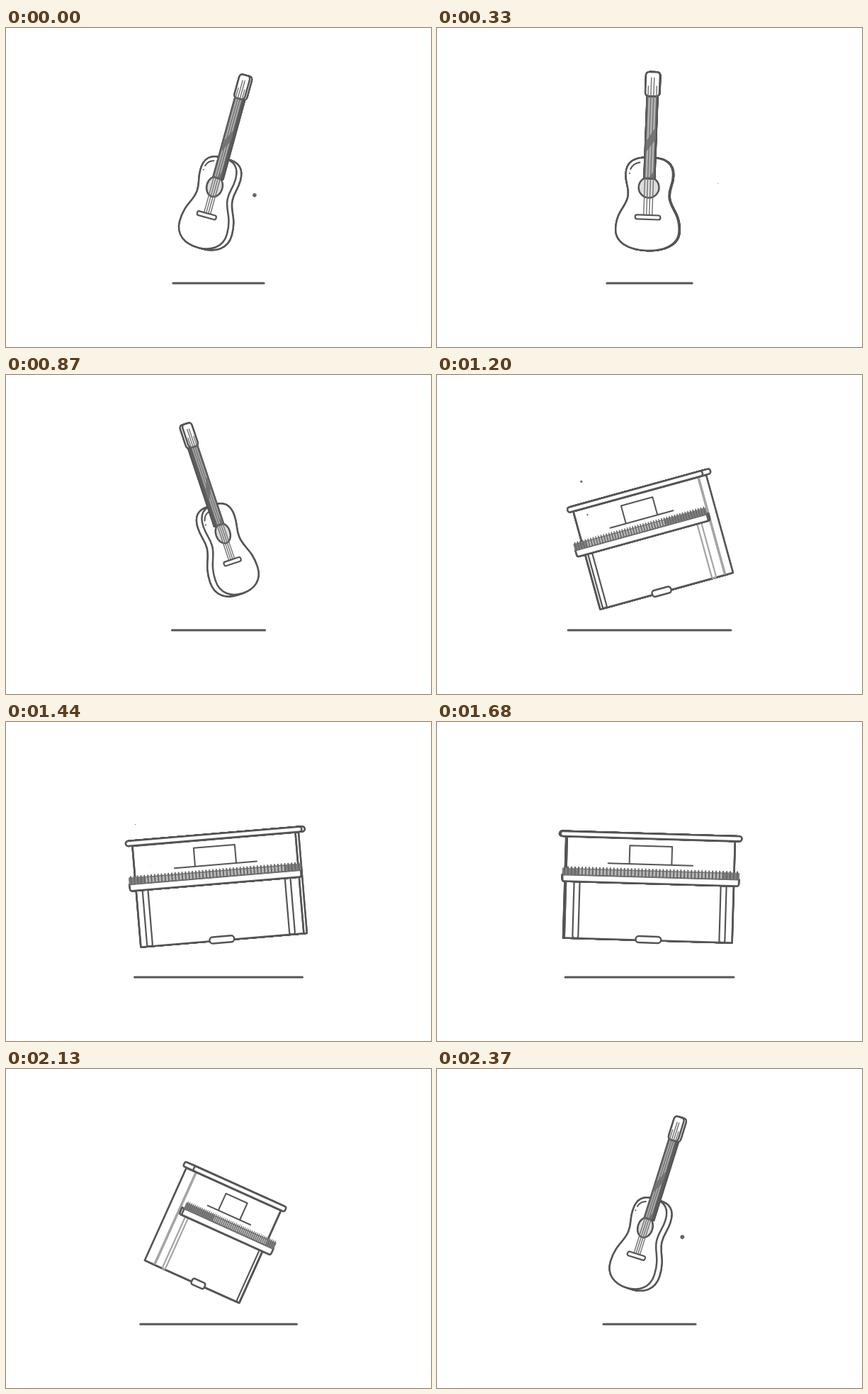
Write an HTML page with a canvas that moves like this. It is 600 px wide and 450 px high and loops after 2.4 s.

```html
<!DOCTYPE html>
<html lang="en">
<head>
<meta charset="utf-8">
<title>Guitar and piano</title>
<style>
  html, body { margin: 0; width: 100%; height: 100%; overflow: hidden; background: #fff; }
  canvas { display: block; }
</style>
</head>
<body>
<canvas id="stage" width="600" height="450"></canvas>
<script>
const ctx = document.getElementById('stage').getContext('2d');
const LOOP = 2400, HALF = 1200, INK = '#555';
const PIVOT = { x: 300, y: 217 };
let cos = 1, sin = 0;   // current yaw of the instrument

const box = (x, y, w, h, r = 0) => {
  const p = new Path2D();
  p.roundRect(x, y, w, h, r);
  return p;
};

// Flattens a path lying at depth z onto the stage.
function project(path, z) {
  const p = new Path2D();
  p.addPath(path, new DOMMatrix([cos, 0, 0, 1, sin * z, 0]));
  return p;
}

function draw(path, z, { fill, stroke = INK, width = 2.5 } = {}) {
  const p = project(path, z);
  if (fill) { ctx.fillStyle = fill; ctx.fill(p); }
  if (stroke) { ctx.strokeStyle = stroke; ctx.lineWidth = width; ctx.stroke(p); }
}

// Sweeps a path from back to front: outline, filled solid, back edge, front face.
function solid(path, back, front, side = '#fff', face = side) {
  const STEPS = 8;
  for (const style of [{}, { fill: side, stroke: null }])
    for (let i = 0; i <= STEPS; i++) draw(path, back + (front - back) * i / STEPS, style);
  draw(path, back);
  draw(path, front, { fill: face });
}

// Guitar
const bodyHalf = 'M0 -34C22 -35 33.5 -27 33.5 -10 C33.5 5 28 7 29 20 C30 36 45 42 45 68 C45 88 24 97 0 97';
const guitarBody = new Path2D(bodyHalf);
guitarBody.addPath(new Path2D(bodyHalf), new DOMMatrix([-1, 0, 0, 1, 0, 0]));
const shine = new Path2D('M-28 -11v.1M-27 -17Q-24 -25 -14 -27');
const hole = new Path2D('M-14.5 8a14.5 14.5 0 1 0 29 0a14.5 14.5 0 1 0 -29 0');
const neck = box(-7.2, -121, 14.4, 116);
const neckShade = new Path2D('M7 -78L-7 -56V-40L7 -60ZM7 -17L0 -6H7Z');
const head = box(-10, -155, 20, 34, 5);
const strings = new Path2D('M-6 -135V49M-2 -147V49M2 -147V49M6 -135V49');
const bridge = box(-18, 47, 36, 6, 3);

function drawGuitar() {
  const FRONT = 5.5;
  solid(guitarBody, -FRONT, FRONT);
  draw(shine, FRONT, { width: 2 });
  draw(hole, FRONT, { fill: '#ddd' });
  solid(neck, FRONT - 5, FRONT, '#666', '#b4b4b4');
  draw(neckShade, FRONT, { fill: '#777', stroke: null });
  solid(head, FRONT - 5, FRONT);
  draw(strings, FRONT, { stroke: '#707070', width: 1.4 });
  draw(bridge, FRONT, { fill: '#fff', width: 2.2 });
}

// Piano
const cabinet = box(-119, -52, 238, 143);
const cabinetEdge = new Path2D('M119 -50V89');
const lid = box(-128.5, -59.5, 257, 7, 3.5);
const stand = new Path2D('M-30 -16.5V-42H30V-16.5M-60 -16H60');
const leg = box(100, 11, 8, 80, [0, 0, 3, 3]);
const pedal = box(-18, 85.5, 36, 9, 4.5);
const shelf = box(-125, 1.5, 250, 9.5, [0, 0, 3, 3]);
const keyBed = box(-125, -7, 250, 8.5);
const keys = new Path2D();
for (let x = -122.5; x <= 122.5; x += 5) keys.addPath(box(x - 1, -10, 2, 12));

const mirrored = (path, side) => {
  const p = new Path2D();
  p.addPath(path, new DOMMatrix([side, 0, 0, 1, 0, 0]));
  return p;
};

function drawPiano() {
  const FRONT = 9, LEG = 16, EDGE = 20;
  // Lines near the side that turns into view become paler, its keys denser.
  const fade = side => side * sin < 0 ? Math.min(1, Math.max(0, Math.abs(sin) - 0.4) / 0.24) : 0;
  solid(cabinet, -FRONT, FRONT);
  for (const side of [-1, 1]) {
    const tone = 85 + 80 * fade(side);
    const stroke = `rgb(${tone},${tone},${tone})`;
    draw(mirrored(cabinetEdge, side), FRONT, { stroke, width: 2.5 + fade(side) });
    draw(mirrored(leg, side), LEG, { stroke, width: 2.2 });
  }
  solid(lid, -FRONT, FRONT);
  draw(stand, FRONT + 2, { width: 2 });
  draw(pedal, FRONT + 2, { fill: '#fff' });
  solid(shelf, EDGE - 4, EDGE);
  draw(keyBed, EDGE, { fill: '#b8b8b8', stroke: '#777', width: 1.5 });
  for (const side of [-1, 1]) {
    const width = 24 + 55 * fade(side);
    draw(mirrored(box(125 - width, -8, width, 9.5), side), EDGE, { fill: '#808080', stroke: null });
  }
  draw(keys, EDGE, { fill: '#666', stroke: null });
}

// Sparks: position, speed per ms, starting radius, lifetime in ms
const guitarSparks = [[29.8, 8, 0.13, -0.018, 4, 600]];
const pianoSparks = [[-47, -96, -0.15, 0.033, 2.3, 600], [-67, -58, -0.065, 0.083, 1.8, 520]];

function drawSparks(sparks, age) {
  ctx.fillStyle = '#666';
  for (const [x, y, vx, vy, radius, life] of sparks) {
    if (age >= life) continue;
    ctx.beginPath();
    ctx.arc(x + vx * age, y + vy * age, radius * (1 - age / life), 0, 2 * Math.PI);
    ctx.fill();
  }
}

function frame() {
  const time = (performance.now() + 186) % LOOP;
  const isGuitar = time < HALF;
  const age = time % HALF;
  const offset = age - HALF / 2;
  const dir = Math.sign(offset);

  // Slow while facing the viewer, fastest at the swap (cubic-bezier(1, 0, 0, 1)).
  const left = Math.max(0, 1 - 2 * Math.abs(offset) / HALF);
  const u = (1 - Math.cbrt(left)) / 2;
  const yaw = dir * Math.PI / 2 * (1 - Math.sqrt(left));
  const roll = dir * (isGuitar ? -1 : 1) * (86 * u + 60 * u * u) * Math.PI / 180;
  const blend = 3 * u * u - 2 * u ** 3;
  const floor = isGuitar ? 60 + 59 * blend : 119 - 59 * blend;

  ctx.setTransform(1, 0, 0, 1, 0, 0);
  ctx.fillStyle = '#fff';
  ctx.fillRect(0, 0, 600, 450);
  ctx.lineCap = ctx.lineJoin = 'round';

  ctx.strokeStyle = INK;
  ctx.lineWidth = 3;
  ctx.beginPath();
  ctx.moveTo(300 - floor, 360);
  ctx.lineTo(300 + floor, 360);
  ctx.stroke();

  ctx.translate(PIVOT.x, PIVOT.y);
  ctx.rotate(roll);
  cos = Math.cos(yaw);
  sin = Math.sin(yaw);
  if (isGuitar) drawGuitar(); else drawPiano();
  drawSparks(isGuitar ? guitarSparks : pianoSparks, age);
  requestAnimationFrame(frame);
}
frame();
</script>
</body>
</html>
```
